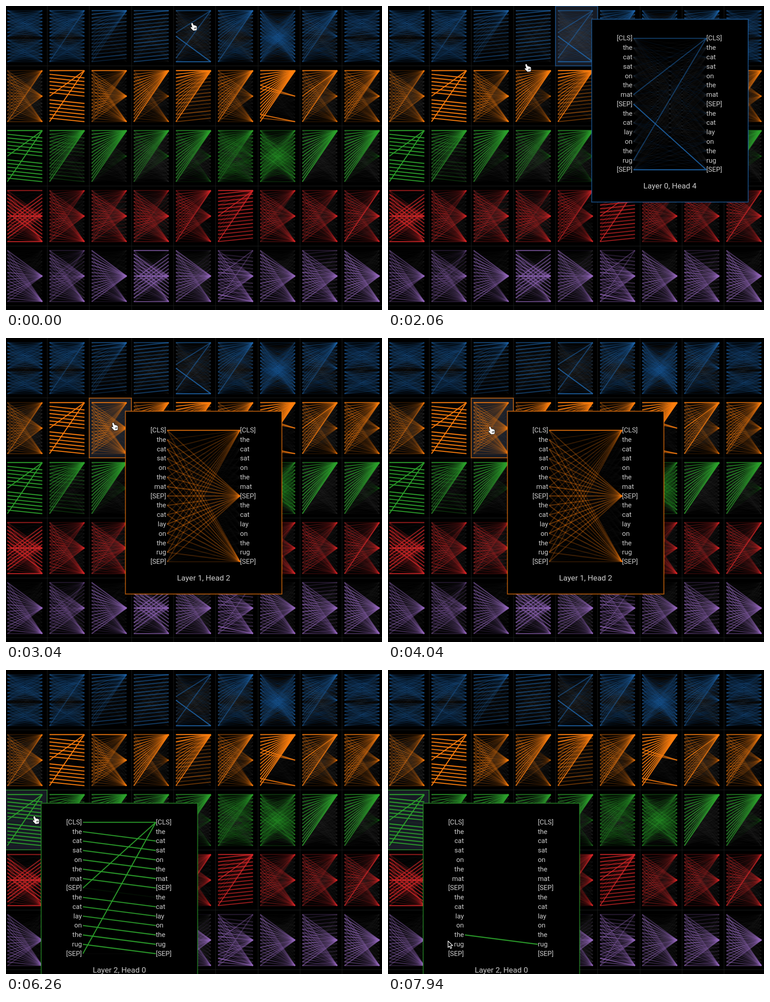
Animation, 833 px wide and 673 px high, one loop 8000 ms. Source, as an HTML page with a canvas:

```html
<!DOCTYPE html>
<html lang="en">
<head>
<meta charset="utf-8">
<title>Attention heads</title>
<style>
html, body { margin: 0; width: 100%; height: 100%; overflow: hidden; background: #000; }
canvas { display: block; }
</style>
</head>
<body>
<canvas id="view" width="833" height="673"></canvas>
<script>
const W = 833, H = 673, LOOP = 8000;
const COL = 93.35, ROW = 132.75;
const TOKENS = '[CLS] the cat sat on the mat [SEP] the cat lay on the rug [SEP]'.split(' ');
const N = TOKENS.length, MID = 7, END = 14;
const COLORS = ['#2068b0', '#ff7f0e', '#2ca02c', '#d62728', '#9467bd'];

// Per head: c/m/e = to [CLS], middle and last [SEP]; p/n = previous, next token;
// x = same place in the other sentence; b/a = own, other sentence; u = everywhere. Percent.
const HEADS = [
  ['b17 u3', 'b16 u4 c8 14>0:35 0>0:40', 'p45 c30 u3', 'p55 u4',
   'u7 0>0:55 6>0:50 13>0:50 7>14:80 14>14:85', 'c30 u6 b8 14>0:50 0>0:50',
   'a13 b6 x12 u4', 'c28 u5 m12 b8 14>0:40', 'b17 p16 u3'],
  ['m30 c22 e22 u6 14>0:45', 'n92 u2', 'm40 c24 e32 u4 0>0:80', 'c62 m16 e16 u4 14>0:75',
   'c62 p42 u3 14>0:80 1>0:85 2>0:85', 'c50 m24 e24 u4 14>0:60',
   'c85 u3 4>7:75 5>7:60 12>14:80 13>14:50', 'c42 m18 e16 u5 14>0:75 7>0:75 0>0:80',
   'c50 m26 e22 u4 0>0:70'],
  ['n92 7>8:8 14>14:4', 'c55 n30 u4', 'c72 m8 u4', 'c58 m10 u6', 'c64 m9 e7 u5',
   'c36 u8 b7 m9', 'x30 c14 u9 a8', 'c70 u5 14>0:85 7>0:80', 'c74 u5 m7'],
  ['x75 m28 e28 u3', 'm38 e36 c22 u4', 'm38 e26 c22 u5 p12', 'm40 e28 c14 u5 x14',
   'c40 m34 e26 u3 14>0:60', 'p75 c25 u2 0>0:80 7>0:75 14>0:75',
   'm34 e32 c24 u4', 'm34 e26 c28 u4', 'm38 e26 c24 u4 14>0:70'],
  ['m46 e42 u3', 'm34 e32 x20 u4 c8', 'm58 e28 u3', 'x68 m34 e24 u4', 'm50 e24 u5 x12',
   'm44 e36 n38 u3 12>14:70', 'm54 e32 u4', 'm52 e34 p24 u4', 'm58 e42 u4']
];

function random(seed) {
  let s = seed;
  return () => (s = (s * 16807) % 2147483647) / 2147483647;
}

function twin(i) {
  return i === 0 || i === MID || i === END ? i : i < MID ? i + 7 : i - 7;
}

const RULES = {
  c: () => [0],
  m: () => [MID],
  e: () => [END],
  p: i => [Math.max(0, i - 1)],
  n: i => [i % 7 ? i + 1 : 0],
  x: i => [twin(i)],
  b: (i, all) => all.filter(j => (j > MID) === (i > MID)),
  a: (i, all) => all.filter(j => (j > MID) !== (i > MID)),
  u: (i, all) => all
};

function links(spec, seed) {
  const rnd = random(seed);
  for (let k = 0; k < 5; k++) rnd();
  const all = TOKENS.map((_, i) => i);
  const grid = all.map(() => new Array(N).fill(0));
  for (const term of spec.split(' ')) {
    const pair = term.match(/^(\d+)>(\d+):(\d+)$/);
    if (pair) {
      grid[pair[1]][pair[2]] = pair[3] / 100;
      continue;
    }
    const v = term.slice(1) / 100;
    for (const i of all) {
      for (const j of RULES[term[0]](i, all)) {
        grid[i][j] += v * (1 - 0.85 * (1 - v) * rnd());
      }
    }
  }
  const out = [];
  for (const i of all) for (const j of all) {
    if (grid[i][j] > 0.012) out.push({ i, j, w: Math.min(grid[i][j], 0.95) });
  }
  return out.sort((p, q) => p.w - q.w);
}

const DATA = HEADS.map((row, r) => row.map((spec, c) => links(spec, 911 * (r + 1) + 7919 * (c + 1))));

function drawLinks(g, r, list, x1, x2, y, gap, width) {
  g.lineWidth = width;
  for (const { i, j, w } of list) {
    g.globalAlpha = w;
    g.strokeStyle = w < 0.06 ? '#666' : COLORS[r];
    g.beginPath();
    g.moveTo(x1, y + i * gap);
    g.lineTo(x2, y + j * gap);
    g.stroke();
  }
  g.globalAlpha = 1;
}

function drawThumb(g, r, c) {
  const x = 3 + c * COL;
  drawLinks(g, r, DATA[r][c], x, x + 77.5, 10.3 + r * ROW, 8.08, 2.4);
}

function makeGrid() {
  const layer = document.createElement('canvas');
  layer.width = W;
  layer.height = H;
  const g = layer.getContext('2d');
  g.fillStyle = '#000';
  g.fillRect(0, 0, W, H);
  g.fillStyle = '#191b1b';
  for (let c = 1; c < 9; c++) g.fillRect(Math.round(c * COL - 2.5), 0, 1, H);
  for (let r = 1; r < 6; r++) g.fillRect(0, Math.round(r * ROW - 0.3), W, 1);
  HEADS.forEach((row, r) => row.forEach((_, c) => drawThumb(g, r, c)));
  return layer;
}

const ctx = document.getElementById('view').getContext('2d');
const gridLayer = makeGrid();

function frameBox(r, x, y, w, h, fill) {
  ctx.fillStyle = fill;
  ctx.fillRect(x, y, w, h);
  ctx.globalAlpha = 0.66;
  ctx.strokeStyle = COLORS[r];
  ctx.lineWidth = 2;
  ctx.strokeRect(x, y, w, h);
  ctx.globalAlpha = 1;
}

function label(text, x, y, size, align) {
  ctx.font = size + 'px Roboto, sans-serif';
  ctx.textAlign = align;
  ctx.fillText(text, x, y);
}

function drawPopup(r, c, hover) {
  frameBox(r, c * COL - 2.3, r * ROW + 0.3, COL, ROW - 0.6, '#171b24');
  drawThumb(ctx, r, c);

  const x = 77.9 + c * COL, y = 29.4 + r * ROW, gap = 20.78;
  frameBox(r, x, y, 346.6, 404.6, '#000');
  const list = DATA[r][c].filter(l => hover < 0 || (l.i === hover && l.w > 0.1));
  drawLinks(ctx, r, list, x + 92.5, x + 254, y + 42.2, gap, 2.4);

  ctx.fillStyle = '#ccc';
  TOKENS.forEach((word, i) => {
    const base = y + 47 + i * gap;
    label(word, x + 90.2, base, 15, 'right');
    label(word, x + 254, base, 15, 'left');
  });
  label(`Layer ${r}, Head ${c}`, x + 173.3, y + 374.8, 17.25, 'center');
}

// Pointer moves: start, end, from, to, eased or even.
const smooth = u => u * u * (3 - 2 * u);
const even = u => u;
const MOVES = [
  [1420, 2540, [411, 38], [236, 188], smooth],
  [3960, 4760, [236, 188], [58, 323], u => (u + smooth(u)) / 2],
  [6180, 6820, [58, 323], [138, 350], smooth],
  [6820, 7060, [138, 350], [144, 397], even],
  [7060, 7940, [144, 397], [133, 600], even]
];

function pointerAt(t) {
  let pos = MOVES[0][2];
  for (const [start, end, a, b, ease] of MOVES) {
    if (t < start) break;
    const stepped = Math.floor((t - start) / 80) * 80;
    const u = ease(Math.min(1, stepped / (end - start)));
    pos = [a[0] + (b[0] - a[0]) * u, a[1] + (b[1] - a[1]) * u];
  }
  return pos;
}

const HAND = new Path2D('M-4 -7.5Q-2.6 -8.8 -1.4 -7L.9 -2.4Q2.6 -3.6 3.5 -2Q5 -2.9 5.8 -1.2' +
  'Q7.2 -1.8 7.6 0L8 4.5L7 8.3L0 9L-3.5 5.4Q-6.5 2.6 -5.6 1.5Q-4 .5 -2 2.5L-4.6 -5.5Z');
const FINGERS = new Path2D('M2 2.5L2.6 6M4 2L4.4 5.6M5.9 1.7L6 5.2');
const ARROW = new Path2D('M0 0L0 14.2L3.3 11.2L5.6 16.4L8 15.3L5.7 10.3L10.3 10Z');

function drawPointer(x, y, arrow) {
  ctx.save();
  ctx.lineJoin = 'round';
  if (arrow) {
    ctx.translate(x, y);
    ctx.fillStyle = '#000';
    ctx.strokeStyle = '#fff';
    ctx.lineWidth = 1.3;
    ctx.fill(ARROW);
    ctx.stroke(ARROW);
  } else {
    ctx.translate(x + 4, y + 7.5);
    ctx.fillStyle = '#fff';
    ctx.strokeStyle = '#000';
    ctx.lineWidth = 1.6;
    ctx.stroke(HAND);
    ctx.fill(HAND);
    ctx.lineWidth = 0.9;
    ctx.stroke(FINGERS);
  }
  ctx.restore();
}

const POPUPS = [[5260, 2, 0], [3040, 1, 2], [500, 0, 4]];

function draw(t) {
  ctx.drawImage(gridLayer, 0, 0);
  const [x, y] = pointerAt(t);
  const inside = t >= 6180 && x > 78;
  const open = POPUPS.find(p => t >= p[0]);
  if (open) {
    const hover = inside && x > 100 ? Math.max(0, Math.floor((y - 337) / 20.78)) : -1;
    drawPopup(open[1], open[2], hover);
  }
  drawPointer(x, y, inside);
}

const begin = performance.now();
function tick() {
  draw((performance.now() - begin) % LOOP);
  requestAnimationFrame(tick);
}
tick();
</script>
</body>
</html>
```
